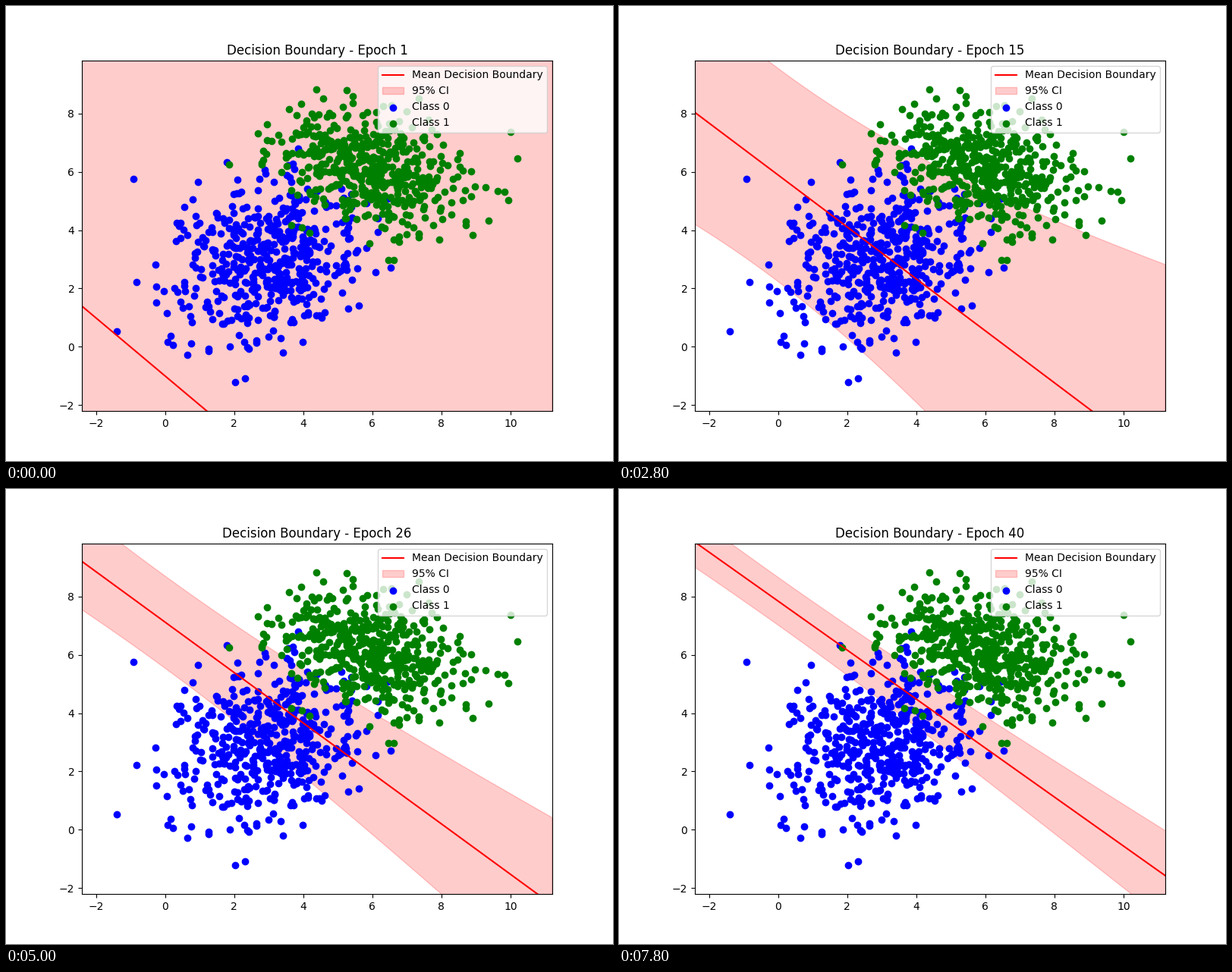
A matplotlib script that plays this animation: 800 by 600 pixels, repeating every 8 s.

```python
import numpy as np
import matplotlib.pyplot as plt
from matplotlib.animation import FuncAnimation

EPOCHS = 40
STEP_MS = 200

np.random.seed(42)
class0 = np.random.multivariate_normal([3, 3], [[2, 0.5], [0.5, 2]], 500)
class1 = np.random.multivariate_normal([6, 6], [[2, -0.5], [-0.5, 1]], 500)
points = np.vstack([class0, class1])
x_min, y_min = points.min(axis=0) - 1
x_max, y_max = points.max(axis=0) + 1
xs = np.linspace(x_min, x_max, 200)


def settle(epoch, start, end, rate):
    """Exponential approach from start (epoch 1) to end."""
    return end + (start - end) * np.exp(-rate * (epoch - 1))


def boundary(epoch):
    """Mean boundary and half width of its confidence band over xs."""
    wobble = 0.01 * epoch * np.sin(2 * np.pi * (epoch - 29) / 20)
    intercept = settle(epoch, -1, 8.2, 0.0945) + wobble
    slope = settle(epoch, -0.995, -0.82, 0.06) + 0.03 * wobble
    # The band's variance is quadratic in x and shrinks as a power law.
    var = (34.5 + 0.18 * xs + 0.69 * xs**2) * (11 / epoch) ** 3.05
    return intercept + slope * xs, np.sqrt(var)


fig, ax = plt.subplots(figsize=(8, 6), dpi=100)
mean, half = boundary(1)
line, = ax.plot(xs, mean, color="red", label="Mean Decision Boundary")
band = ax.fill_between(xs, mean - half, mean + half,
                       color="red", alpha=0.2, label="95% CI")
ax.scatter(*class0.T, color="blue", label="Class 0")
ax.scatter(*class1.T, color="green", label="Class 1")
ax.set_xlim(x_min, x_max)
ax.set_ylim(y_min, y_max)
ax.legend(loc="upper right")
title = ax.set_title("Decision Boundary - Epoch 1")


def update(i):
    epoch = i + 1
    mean, half = boundary(epoch)
    line.set_ydata(mean)
    lower = np.column_stack([xs, mean - half])
    upper = np.column_stack([xs, mean + half])
    band.set_verts([np.vstack([lower, upper[::-1]])])
    title.set_text(f"Decision Boundary - Epoch {epoch}")
    return line, band, title


anim = FuncAnimation(fig, update, frames=EPOCHS, interval=STEP_MS,
                     init_func=lambda: update(0), repeat=True, repeat_delay=0)
plt.show()
```
